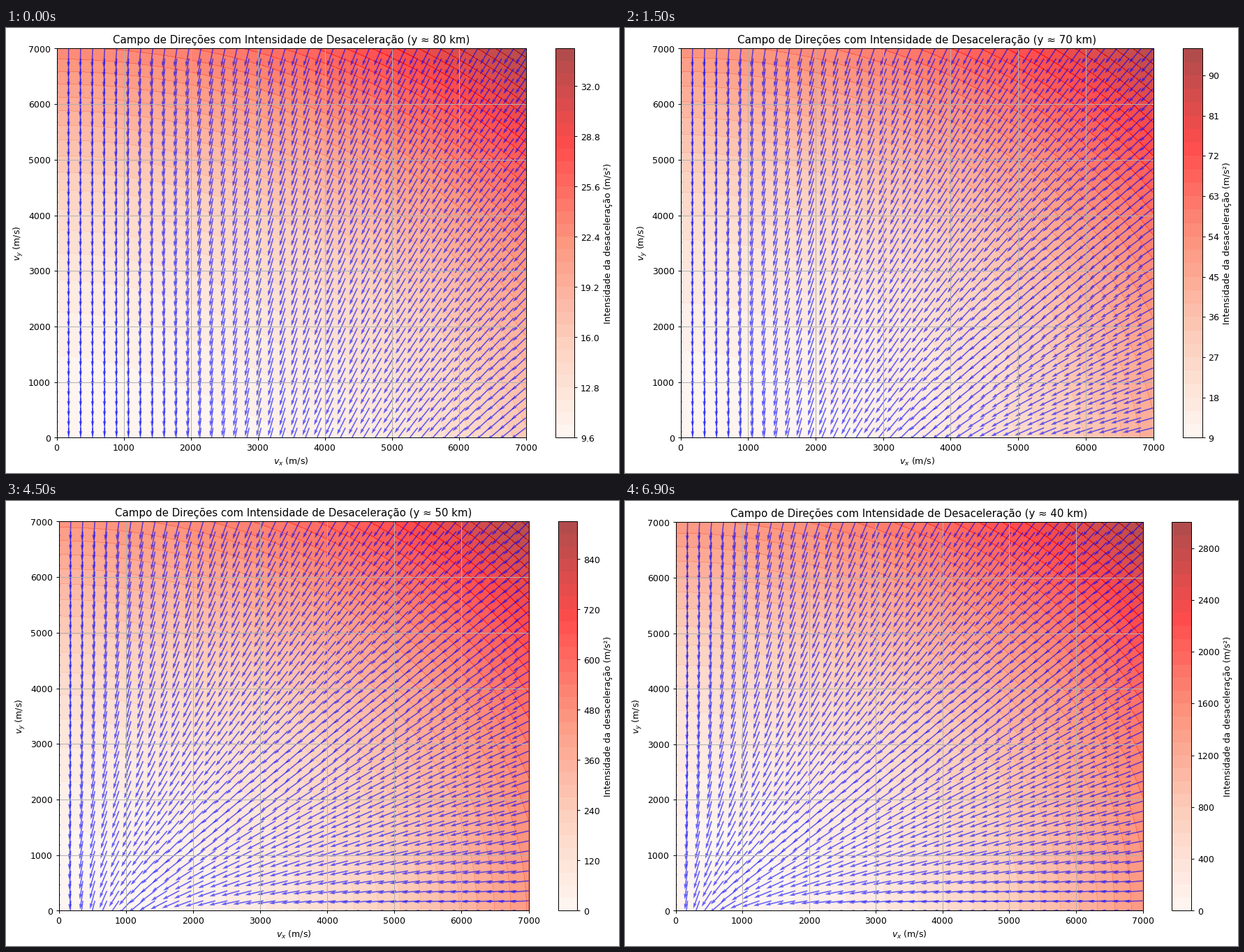
Animation of 878 by 638 pixels, one loop 7500 ms. Source, as a matplotlib script:

```python
import numpy as np
import matplotlib.pyplot as plt
from matplotlib.animation import FuncAnimation
from matplotlib.colors import LinearSegmentedColormap

W, H, DPI = 878, 638, 90
G = 9.81             # gravity, m/s²
RHO0, HS = 1.225, 8500.0   # sea-level density, scale height
DRAG = 0.00271       # Cd * A / (2 m)
VMAX, N = 7000, 40

# altitude (km), then left edge, width and top of the axes in pixels
VIEWS = [
    (80, 72, 672, 29),
    (70, 79, 677, 29),
    (60, 75, 674, 29),
    (50, 75, 673, 29),
    (40, 72, 669, 30),
]
BOTTOM = 587
BASE_W = 669.6       # axes width at which text has its nominal size

HEAT = LinearSegmentedColormap.from_list(
    "heat", ["#fff5f0", "#fcbba1", "#fb6a4a", "#ff0000", "#8b0000"])

v = np.linspace(0, VMAX, N)
VX, VY = np.meshgrid(v, v)

fig = plt.figure(figsize=((W + 0.01) / DPI, (H + 0.01) / DPI), dpi=DPI)


def add_axes(left, width, top):
    y0 = H - BOTTOM - 0.5
    return fig.add_axes([(left + 0.5) / W, y0 / H,
                         width / W, (BOTTOM - top) / H])


def acceleration(alt_km):
    k = DRAG * RHO0 * np.exp(-alt_km * 1000 / HS)
    speed = np.hypot(VX, VY)
    return -k * speed * VX, -G - k * speed * VY


def update(i):
    fig.clf()
    alt, left, width, top = VIEWS[i]
    plt.rcParams["font.size"] = 10 * width / BASE_W
    ax = add_axes(left, width, top)
    cax = add_axes(left + 1.0625 * width, (BOTTOM - top) / 20, top)

    a_x, a_y = acceleration(alt)
    mag = np.hypot(a_x, a_y)
    fill = ax.contourf(VX, VY, mag, levels=30, cmap=HEAT, alpha=0.7)
    ax.quiver(VX, VY, a_x / mag, a_y / mag, color="blue", scale=25, alpha=0.6)

    ax.set_xlim(0, VMAX)
    ax.set_ylim(0, VMAX)
    ax.set_xlabel("$v_x$ (m/s)")
    ax.set_ylabel("$v_y$ (m/s)")
    ax.set_title("Campo de Direções com Intensidade de Desaceleração "
                 f"(y ≈ {alt} km)")
    ax.grid(True)
    fig.colorbar(fill, cax=cax, label="Intensidade da desaceleração (m/s²)")
    return []


anim = FuncAnimation(fig, update, frames=len(VIEWS), interval=1500,
                     repeat=True, repeat_delay=0)
plt.show()
```
